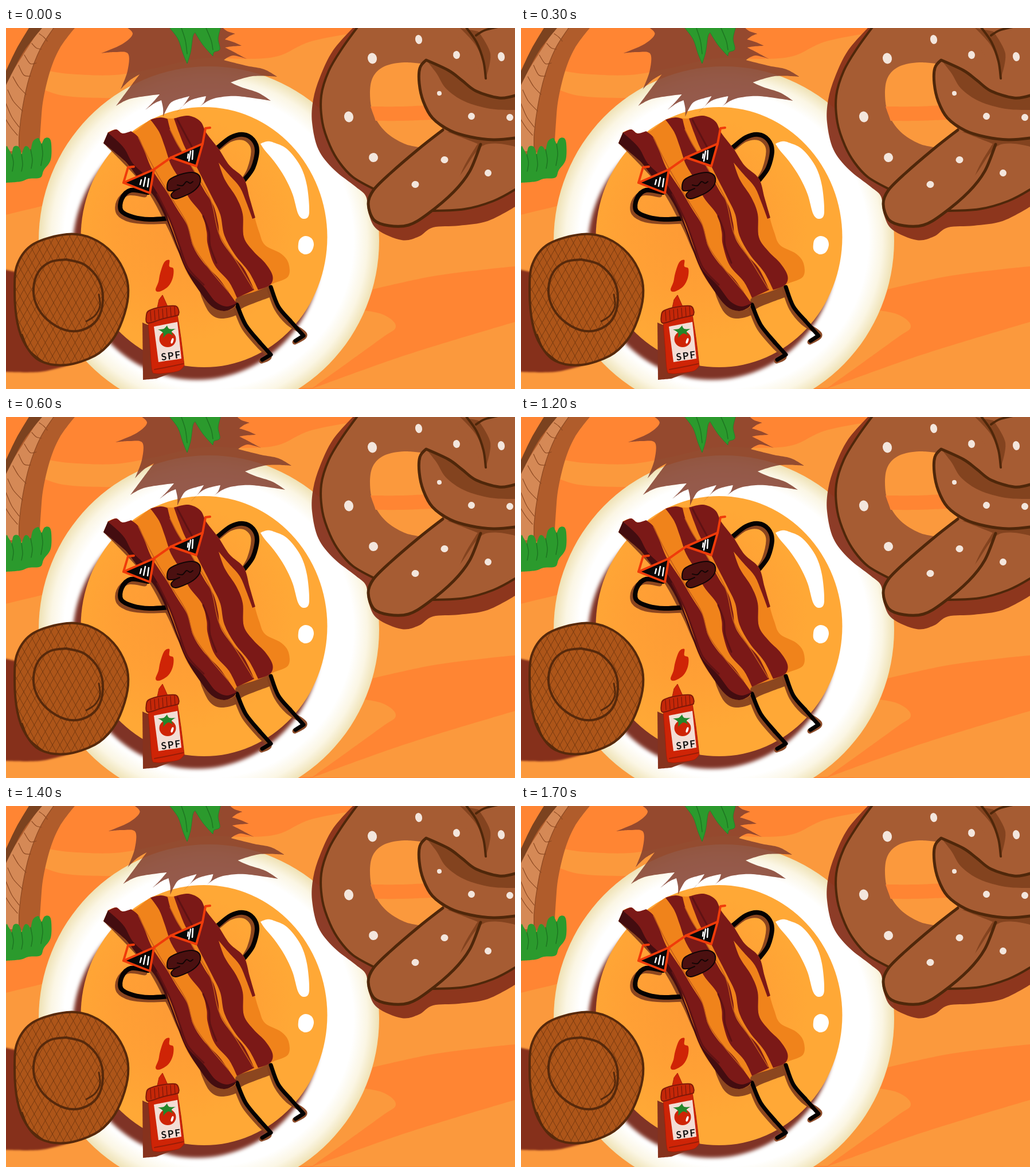
Write an HTML page with a canvas that moves like this. It is 888x630 px and loops after 1.9 s.

```html
<!DOCTYPE html>
<html lang="en">
<head>
<meta charset="utf-8">
<title>Breakfast beach</title>
<style>
  html, body { margin: 0; width: 100%; height: 100%; overflow: hidden; background: #ff8533; }
  canvas { display: block; width: 888px; height: 630px; }
</style>
</head>
<body>
<canvas id="stage" width="888" height="630"></canvas>
<script>
const ctx = document.getElementById('stage').getContext('2d');
const SAND = '#ff8533', LIGHT_SAND = '#fb993d', SHADE = '#86301b', GREEN = '#2b9a2d';
const DOUGH = '#a65c33', DOUGH_DARK = '#83431f', DOUGH_LINE = '#4f270a';
const MEAT = '#7b1917', FAT = '#f0831b', RED = '#cf2406';

// Smooth curve through "x,y" points; a trailing "!" makes a point a sharp corner.
function curve(text, closed = true) {
  const points = text.trim().split(/\s+/).map(word => {
    const [x, y] = word.replace('!', '').split(',').map(Number);
    return { x, y, corner: word.endsWith('!') };
  });
  const n = points.length;
  const at = i => closed ? points[(i + n) % n] : points[Math.max(0, Math.min(n - 1, i))];
  const handle = (i, sign) => {
    const p = at(i), k = p.corner ? 0 : sign / 6;
    return [p.x + (at(i + 1).x - at(i - 1).x) * k, p.y + (at(i + 1).y - at(i - 1).y) * k];
  };
  const path = new Path2D();
  path.moveTo(points[0].x, points[0].y);
  for (let i = 0; i < (closed ? n : n - 1); i++) {
    path.bezierCurveTo(...handle(i, 1), ...handle(i + 1, -1), at(i + 1).x, at(i + 1).y);
  }
  return path;
}

function blob(fill, text, outline, width) {
  const path = curve(text);
  ctx.fillStyle = fill;
  ctx.fill(path);
  if (outline) {
    ctx.strokeStyle = outline;
    ctx.lineWidth = width;
    ctx.stroke(path);
  }
  return path;
}

function line(color, width, ...texts) {
  ctx.strokeStyle = color;
  ctx.lineWidth = width;
  for (const text of texts) ctx.stroke(curve(text, false));
}

function ellipse(fill, x, y, rx, ry, angle = 0) {
  ctx.fillStyle = fill;
  ctx.beginPath();
  ctx.ellipse(x, y, rx, ry, angle, 0, 7);
  ctx.fill();
}

function group(settings, draw) {
  ctx.save();
  Object.assign(ctx, settings);
  draw();
  ctx.restore();
}

function gradient(x, y, radius, stops) {
  const g = ctx.createRadialGradient(x, y, 0, x, y, radius);
  for (const [offset, color] of stops) g.addColorStop(offset, color);
  return g;
}

function drawSand() {
  ctx.fillStyle = SAND;
  ctx.fillRect(0, 0, 888, 630);
  blob(LIGHT_SAND, `60,72! 110,80 190,82 260,70 340,53 420,54 475,49 530,24 605,9! 700,0! 888,0!
    888,416! 830,422 740,434 640,456! 600,490! 655,499 680,521 650,545 535,628! 440,630!
    400,300! 260,115! 190,122 100,118 50,100!`);
  blob(LIGHT_SAND, '535,629! 700,570 888,513! 888,630!');
  blob(LIGHT_SAND, '0,326! 70,309! 200,400! 200,620 150,630! 0,630!');
}

function drawPlate() {
  group({}, () => {
    ctx.translate(354, 371);
    ctx.scale(297, 304);
    ellipse(gradient(0, 0, 1, [[0, '#fff'], [.85, '#fff'], [.93, '#fbf6e4'], [1, '#efe2b5']]), 0, 0, 1, 1);
  });
  group({ filter: 'blur(3px)' }, () => ellipse('#7f3326', 333, 388, 217, 226));
  ellipse(gradient(300, 350, 250, [[0, '#fd9a35'], [.45, '#ffa035'], [.8, '#ffa836'], [1, '#ffa836']]),
    345.5, 365, 215, 227);
  blob('#fff', '444,202! 455,198 467,200 490,211 513,240 525,275 529,322 521,333 510,325 500,290 486,260 468,233 452,214');
  blob('#fff', '513,368 522,363 533,367 537,378 532,391 521,395 511,388 510,377');
}

function drawPalmShadow(offset) {
  group({ globalAlpha: .86 }, () => {
    ctx.translate(offset, 0);
    blob('#843f2e', `206,-4! 221,10 203,28 166,44! 190,42 213,45 212,75 200,107! 215,92 233,81! 215,105
      192,136! 215,124 250,118 268,116! 256,130 243,143! 258,132 271,126! 274,140 274,155! 281,140
      291,128 320,119! 311,133 298,147! 320,127 349,119! 345,130 337,138! 353,127 372,121 405,119
      462,127! 440,113 410,103 392,95! 430,84 473,85! 450,72 420,66 380,56! 396,48 420,54! 394,40
      382,34! 395,32 411,31! 398,25 382,20! 390,14 400,10! 385,5 375,-4!`);
  });
}

function drawPalm() {
  blob('#b05c2b', '46,0! 120,0! 94,35 77,75 65,125 61,165 58,215! 0,220! 0,88!');
  blob('#d58956', '60,0! 83,0! 60,36 41,85 29,138 23,185 23,215! 0,215! 0,94!');
  blob('#7b421f', '40,0! 63,0! 33,38 14,72 0,100! 0,75! 18,37');
  line('#8e4a23', 1.2, '83,0 60,36 41,85 29,138 23,185 23,215', '58,10 66,16 72,23', '45,27 53,35 62,37',
    '32,47 42,62 53,61', '22,65 31,82 43,84', '12,85 22,102 35,116', '3,108 13,128 29,145',
    '0,132 10,155 23,173', '0,160 9,174 20,187');
  blob(GREEN, `0,210 5,212 10,222! 13,208 20,206 25,212 27,222! 32,208 38,207 43,215!
    47,198 56,192 60,198 62,204! 67,193 75,192 79,202 78,230 66,248 60,261 40,263 25,268 0,270!`);
  line('#1e7622', 1.5, '10,220 13,235 11,250', '27,220 29,238 27,250', '43,212 46,230 44,245', '62,202 64,220 61,240');
  blob(GREEN, '284,-2! 300,19 309,45 316,62! 322,42 326,15 330,8! 344,30 361,49! 363,42 373,37 370,18 375,-2!', '#228429', 1);
  line('#1e7622', 1.5, '306,0 313,22 316,45', '349,0 358,22 361,38');
}

function drawPretzel() {
  group({ globalAlpha: .94 }, () => blob(SHADE, `605,0! 570,40 548,85 536,125 534,165 545,212 572,247
    610,277 628,294 633,325 648,352 690,370 720,364 745,348 790,345 840,337 888,312! 888,0!`));
  const body = '888,282! 850,302 800,316 738,319! 640,280! 605,260 582,235 565,205 552,165 550,118 563,75 586,36 615,-4!';
  blob(DOUGH, body + ' 888,-4!');
  line(DOUGH_LINE, 4, body);
  blob(LIGHT_SAND, '635,116 640,86 660,67 695,60 730,63! 724,100 735,143 764,178! 728,209! 695,202 662,181 641,150');
  blob(SAND, '636,137! 690,137 734,135! 744,160! 690,162 645,162!');

  blob(DOUGH_DARK, '792,0! 824,6! 845,45 837,88!');
  blob(DOUGH, '792,0! 818,28 831,56 836,88! 820,63 790,18');
  line(DOUGH_LINE, 4, '802,-2 821,25 833,58 837,88', '820,13 835,4 858,-2');

  blob(DOUGH_DARK, '758,180! 888,190! 888,207! 833,205 790,260 735,325!');
  blob(DOUGH, '762,178! 720,211 670,254 641,283 632,307 642,335 668,345 702,344 735,323 776,290 800,240 823,202!');
  line(DOUGH_LINE, 5, '762,178 720,211 670,254 641,283 632,307 642,335 668,345 702,344 735,325 781,286 809,250 828,203');

  const arm = '888,118! 860,122 820,110 795,91 772,74 733,56! 722,70 721,97 728,128 744,157 775,179 810,190 850,195 888,192!';
  blob(DOUGH, arm);
  blob(DOUGH_DARK, '733,56! 772,74 795,91 820,110 860,122 888,118! 888,143! 845,141 800,128 768,106 751,79');
  line(DOUGH_LINE, 5, arm);

  const salt = [[639, 53, 8, 9.5], [720, 20, 6, 8], [786, 47, 6, 7], [864, 50, 6, 8], [598, 155, 8, 9.5], [756, 114, 4, 4],
    [812, 154, 6, 6], [879, 156, 6, 6], [641, 226, 8, 8], [765, 230, 6.5, 6], [714, 273, 6.5, 6], [841, 253, 6, 6]];
  for (const grain of salt) ellipse('#f3e6dd', ...grain, -.2);
}

function drawHat() {
  group({ filter: 'blur(1.5px)' }, () =>
    blob(SHADE, '-5,421! 18,426! 40,520! 110,588! 60,600 -5,600!'));
  const brim = blob('#ad5519', `106,360 150,367 187,394 209,432 213,468 203,510 185,545 155,572
    105,588 60,581 34,553 20,515 15,460 20,412 48,377`);
  group({}, () => {
    ctx.clip(brim);
    for (let i = -14; i < 36; i++) {
      const x = i * 13;
      line('#6b340f', .8, `${x},600 ${x + 145},350`, `${x},350 ${x + 135},600`);
    }
  });
  ctx.strokeStyle = '#57290b';
  ctx.lineWidth = 4;
  ctx.stroke(brim);
  line('#57290b', 4, '105,404 137,413 162,440 169,475 159,509 133,527 103,527 72,509 53,483 48,454 57,425 78,408 105,404');
  line('#57290b', 3, '162,465 164,485 155,502 140,512', '28,535 40,562 65,583');
}

function drawBacon() {
  group({ globalAlpha: .95 }, () => {
    blob('#86421e', `170,201! 240,275 280,345 303,395 331,438 342,472 356,498 375,507 402,501 414,488
      466,468! 440,380! 240,220!`);
    line('#86421e', 9, '242,291 213,288 197,303 197,323 218,335 250,338 285,337',
      '368,212 390,195 412,191 427,200 432,216 425,247 413,268',
      '401,489 416,524 441,554 459,573 446,581', '460,457 472,489 492,514 521,535 504,548');
  });
  line('#050202', 8, '248,287 218,283 202,298 201,319 222,330 250,334 287,332',
    '370,208 392,191 414,186 431,195 438,214 431,244 416,265');
  line('#050202', 7, '403,483 418,518 443,549', '443,549! 462,570! 447,579!',
    '462,452 475,486 496,511', '496,511! 519,537! 505,546!');

  blob(FAT, `178,182! 192,177 204,184 225,180 252,160 270,156 290,158 318,153 339,163 350,184 371,211
    390,240 415,263 425,297 434,331 442,357 452,379 480,394 493,411 492,434 466,446 440,458 403,471
    400,486 380,494 360,486 336,457 314,424 297,380 280,335 263,295 240,270 215,241 190,216 170,201!`);
  blob('#430d10', '178,182! 205,200 232,234 265,285 289,350 315,410 370,469 402,478! 398,487 380,494 358,485 333,453 313,420 297,380 280,335 260,296 232,263 207,232 170,201!');
  blob(MEAT, `178,183! 192,177 203,184 218,180! 232,192 242,216 255,247 280,285 298,315 318,348 326,380
    344,409 372,438 389,462 402,480! 385,486 365,477 344,450 315,419 300,378 285,334 264,288 243,258
    221,236 207,211 193,196`);
  blob(MEAT, `252,160! 270,156 282,159! 287,178 298,202 313,224 328,250 345,282 362,310 370,341
    374,367 392,394 415,420 433,457! 403,471! 389,443 364,414 352,378 350,355 342,326 319,296
    305,267 288,239 277,207 267,181`);
  blob(MEAT, `293,158! 318,153 339,163 350,184 371,211 390,240 415,263 425,297 435,331! 430,333!
    420,306 408,278 389,256 371,235! 382,265 402,296 413,325 415,365 432,390 452,410 465,432
    461,448 440,457! 424,426 399,395 381,362 374,326 361,298 342,261 327,232 313,210 302,183`);
  line('#c25b19', 1.5, '231,191 246,222 265,257 291,300 315,340 328,382 356,422 388,460',
    '286,177 300,204 325,244 357,300 372,360 403,409 431,455');
  line('#5f1213', 3, '264,290 286,335 302,378 317,418 345,448', '299,160 315,190 333,223', '344,328 354,355 356,380 367,410');

  blob('#4b1010', '281,277 285,265 303,256 325,252 338,259 337,274 322,288 296,298 288,291 296,283! 284,284', '#120505', 2);
  line('#120505', 2, '296,283 303,280', '299,274 308,275 315,268 321,271 326,268');

  const frame = '#f03b0a';
  blob('#0a0808', '205,270! 258,247! 251,288!', frame, 4);
  blob('#0a0808', '288,226! 343,202! 332,241!', frame, 4);
  line(frame, 4, '258,247 275,235 288,226', '343,202! 348,175! 356,174!', '205,270! 213,243! 223,242!');
  line('#fff', 2.5, '236,265 234,273', '243,261 240,276', '249,263 247,277', '318,220 317,227', '322,215 319,232', '326,214 325,229');
}

function drawKetchup() {
  blob('#86321d', '238,514! 252,520! 300,598! 262,612! 239,614!');
  blob(RED, '285,405 276,409 269,428 266,443 261,457 268,460 283,451 291,436 292,420 285,416');
  blob(RED, '264,488! 267,474! 273,466! 282,486!', '#a71c08', 1);
  blob(RED, '248,513! 299,501! 305,540 311,589! 302,598 280,602 262,603 255,598 252,565!', '#a71c08', 1);
  blob('#c52708', '245,501 250,493 271,487 295,485 301,492 301,500 297,502 272,508 247,515', '#801909', 2);
  for (let i = 0; i < 7; i++) {
    const x = 252 + i * 7, y = 499 - i * 1.3;
    line('#801909', 1.3, `${x},${y - 5} ${x + 1},${y + 12}`);
  }
  line('#981d08', 2, '259,596 280,592 309,586');
  blob('#f3ddd5', '258,521! 299,513! 306,577! 266,583!');
  ellipse(RED, 282, 543, 14.5, 14);
  blob('#23872a', '265,526! 275,525 281,519! 285,525 296,525! 289,530 292,537! 283,533 274,541! 274,532');
  ellipse('#fff', 290, 546, 2, 5, .3);
  group({ fillStyle: '#111', font: 'bold 17px Lato, sans-serif', textAlign: 'center' }, () => {
    ctx.translate(288, 578);
    ctx.rotate(-.13);
    [...'SPF'].forEach((letter, i) => ctx.fillText(letter, (i - 1) * 12, 0));
  });
}

function drawScene(offset) {
  ctx.lineCap = ctx.lineJoin = 'round';
  drawSand();
  drawPlate();
  drawPalmShadow(offset);
  drawPalm();
  drawPretzel();
  drawHat();
  drawBacon();
  drawKetchup();
}

// The palm shadow sways right and back in six equal steps, resting at each end.
let shownStep = -1;
function tick() {
  const beat = Math.floor(performance.now() % 1900 / 100);
  const step = Math.max(0, Math.min(6, beat, 17 - beat));
  if (step !== shownStep) {
    drawScene(step * 25 / 6);
    shownStep = step;
  }
  requestAnimationFrame(tick);
}
tick();
</script>
</body>
</html>
```
